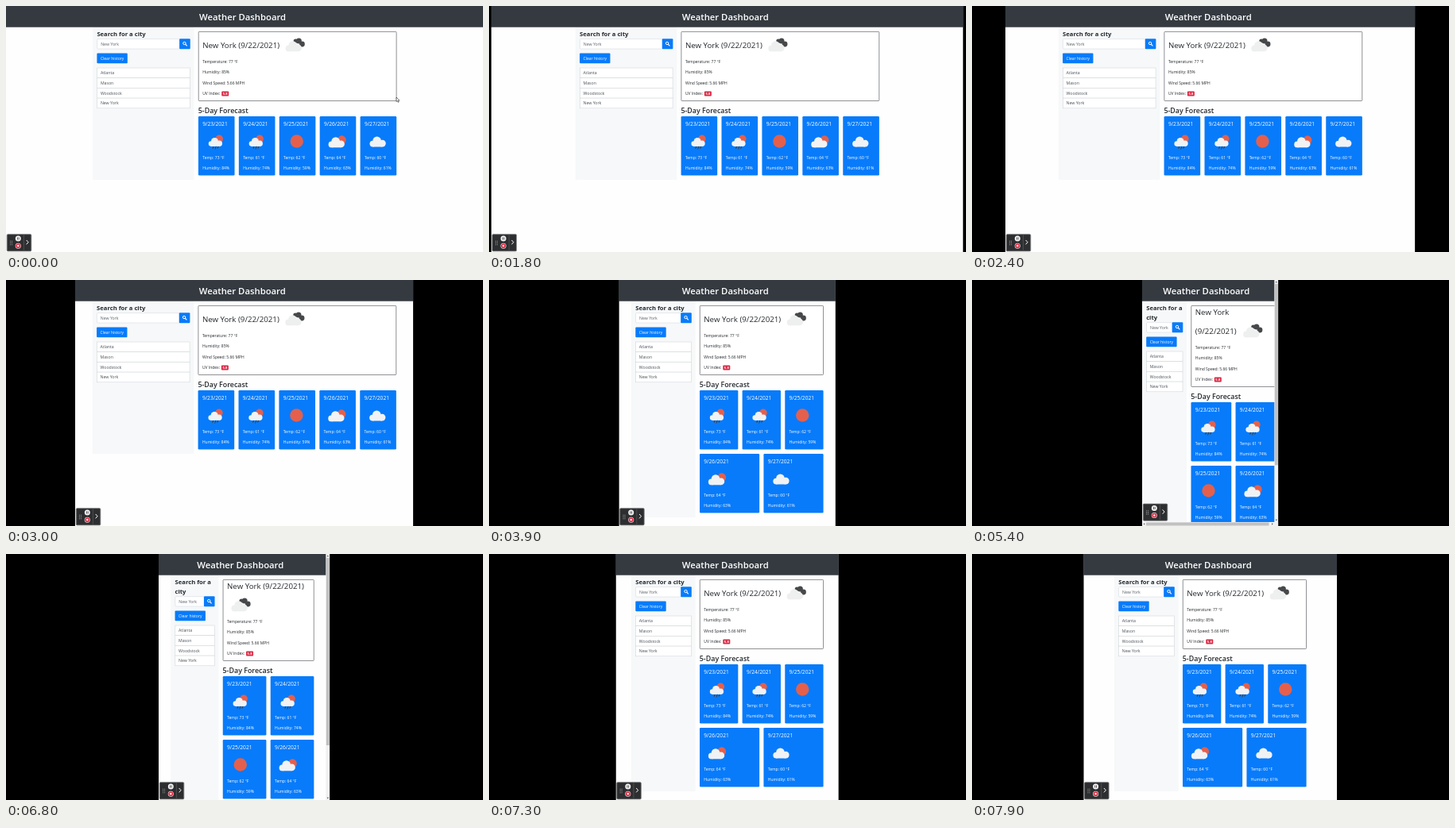
An HTML page for the animation above (8 s loop, 600x310 px).

```html
<!DOCTYPE html>
<html lang="en">
<head>
<meta charset="utf-8">
<title>Weather Dashboard</title>
<style>
html, body { margin: 0; width: 100%; height: 100%; overflow: hidden; background: #000; }
svg { display: block; width: 600px; height: 310px; font-family: "Open Sans", "Noto Sans", sans-serif; }
</style>
</head>
<body>
<svg id="stage" viewBox="0 0 600 310"></svg>
<script>
const LOOP = 8000, STEP = 100, H = 310, BAR = 5;
const BLUE = '#087bfa', INK = '#25292d', SUN = '#e4604d';

// Left edge of the browser window over time
const edge = [[0, 0], [1700, 0], [1800, 2.8], [2600, 55], [3000, 87], [3500, 139], [3900, 163.4],
  [4400, 186], [5300, 210], [5400, 214], [6200, 227], [6300, 228], [6500, 228],
  [6600, 218], [6800, 192], [7400, 153], [7900, 140.3]];
const pointer = [[0, 491, 115], [100, 493, 117], [600, 597, 160], [1000, 597, 160], [1200, 603, 164]];

const days = [
  ['9/23/2021', 'rain', 73, 84], ['9/24/2021', 'rain', 61, 74], ['9/25/2021', 'sun', 62, 59],
  ['9/26/2021', 'partly', 64, 63], ['9/27/2021', 'cloud', 60, 61]
];
const cities = ['Atlanta', 'Mason', 'Woodstock', 'New York'];

function track(keys, t, col = 1) {
  const i = keys.findIndex(k => k[0] > t);
  if (i < 0) return keys[keys.length - 1][col];
  const a = keys[i - 1], b = keys[i];
  return a[col] + (b[col] - a[col]) * (t - a[0]) / (b[0] - a[0]);
}

const rect = (x, y, w, h, fill, extra = '') =>
  `<rect x="${x}" y="${y}" width="${Math.max(0, w)}" height="${h}" fill="${fill}" ${extra}/>`;
const circle = (x, y, r, fill) => `<circle cx="${x}" cy="${y}" r="${r}" fill="${fill}"/>`;
const line = (d, color, w) =>
  `<path d="${d}" fill="none" stroke="${color}" stroke-width="${w}" stroke-linecap="round"/>`;
const text = (x, y, s, size, fill = INK, weight = 400, anchor = 'start') =>
  `<text x="${x}" y="${y}" font-size="${size}" fill="${fill}" font-weight="${weight}" text-anchor="${anchor}">${s}</text>`;
const place = (x, y, body, k = 1) => `<g transform="translate(${x} ${y}) scale(${k})">${body}</g>`;

const cloud = (x, y, k, fill) => place(x, y,
  circle(-6.2, 2.6, 3.9, fill) + circle(-1, -1.2, 5.3, fill) +
  circle(5.8, 2.1, 4.4, fill) + rect(-6.2, 0, 12, 6.5, fill), k);

const icons = {
  rain: circle(4.3, -3.6, 4.8, SUN) + cloud(-.6, .4, .85, '#f1f2f3') +
    line('M-3 6.4l-.8 2.2M.2 6.2l-1 3M3 6.2l-.8 2.2', '#2f3a48', .9),
  sun: circle(0, -.5, 8.2, SUN),
  partly: circle(5.7, -2.3, 5.4, SUN) + cloud(-1, .8, 1, '#f1f2f3'),
  cloud: cloud(0, 0, 1, '#f1f2f3'),
  broken: circle(.5, -5, 2.6, '#46484a') + circle(4.6, -5, 3.5, '#46484a') +
    circle(8.7, -1, 3.4, '#46484a') + cloud(-2, 1.8, 1, '#eeefef')
};

function layout(left) {
  const right = left ? 599.3 - left : 600;
  const width = right - left;
  const tall = width < 261, tiny = width < 196;
  const end = tall ? right - BAR : right;
  const mid = (left + end) / 2;
  const total = tiny ? end - left + 2 : tall ? 180 : width < 337 ? 241.5 : width < 408 ? 322 : 382;
  const x = tiny ? left : mid - total / 2 + .2;
  const mainX = x + total / 3 + 5.4;
  return { left, right, end, mid, tall, tiny, total, x, mainX, mainW: x + total - mainX };
}

function sidebar(p, bottom) {
  const x = p.x + 5.2, w = p.total / 3 - 10, wrap = w < 61;
  let s = rect(p.x, 26.7, p.total / 3, bottom - 26.7, '#f6f8f9');
  const head = !wrap ? ['Search for a city'] : w < 44 ? ['Search', 'for a city'] : ['Search for a', 'city'];
  head.forEach((h, i) => s += text(x, 37.5 + i * 12, h, 7.65, INK, 700));
  let b = rect(x + .3, 41.6, w - 13.5, 12.4, '#fff', 'stroke="#ced4da" stroke-width=".5" rx="1"');
  b += text(x + 4.8, 49.8, 'New York', 5.2, '#5a6168');
  b += rect(x + w - 13.6, 41.3, 13.6, 13, BLUE, 'rx="1"');
  b += place(x + w - 6.8, 47.5, '<circle cx="-.5" cy="-.5" r="1.7" fill="none" stroke="#fff"/>' + line('M.9 .9L2.5 2.5', '#fff', 1.1));
  b += rect(x, 59.5, 38.4, 12.8, BLUE, 'rx="1"') + text(x + 19.2, 67.8, 'Clear history', 5, '#fff', 400, 'middle');
  cities.forEach((c, i) => {
    const y = 78 + i * 12.7;
    b += rect(x + .3, y, w - .6, 12.7, '#fff', 'stroke="#d3d7da" stroke-width=".6"');
    b += text(x + 4.5, y + 8.3, c, 5.2, '#495057');
  });
  return s + place(0, wrap ? 12 : 0, b);
}

// The heading and its icon wrap like inline content
function headingLines(room) {
  const parts = room < 96.5 ? [['New York', 43], ['(9/22/2021)', 53]] : [['New York (9/22/2021)', 97]];
  const last = parts[parts.length - 1];
  const inline = last[1] + 36.5 <= room;
  return { parts, inline, iconX: inline ? last[1] + 19.5 : 17.5, extra: (parts.length - (inline ? 1 : 0)) * 15 };
}

function current(p, head) {
  const x = p.mainX + 5.3, { parts, inline, iconX, extra } = head;
  let s = rect(p.mainX + .3, 32.4, p.mainW - .4, 87.1 + extra, '#fff', 'stroke="#686d72" stroke-width=".75" rx=".8"');
  parts.forEach((part, i) => {
    const besideIcon = inline && i === parts.length - 1;
    s += text(x, besideIcon ? 53.3 + extra : 43.7 + i * 15, part[0], 9.73);
  });
  s += place(x + iconX, 49 + extra, icons.broken);
  let b = '';
  ['Temperature: 77 °F', 'Humidity: 85%', 'Wind Speed: 5.66 MPH', 'UV Index:'].forEach((row, i) =>
    b += text(x, 72 + i * 13.45, row, 5));
  b += rect(x + 24, 107.4, 9, 6, '#dc2743', 'rx="1"') + text(x + 28.5, 112, '5.8', 4.2, '#fff', 700, 'middle');
  return s + place(0, extra, b);
}

function forecast(p, extra) {
  const gap = 5.3, per = Math.max(1, Math.floor(p.total * 2 / 3 / 50 + .001));
  let s = text(p.mainX - .2, 134.8, '5-Day Forecast', 8.9, INK, 600);
  days.forEach(([date, icon, temp, wet], i) => {
    const row = Math.floor(i / per), n = Math.min(per, days.length - row * per);
    const w = (p.mainW - (n - 1) * gap) / n;
    s += place(p.mainX + (i % per) * (w + gap), 139 + row * 80,
      rect(0, 0, w, 74.5, BLUE, 'rx="1.3"') +
      text(5.3, 12.1, date, 6.65, '#fff') + place(22, 32, icons[icon]) +
      text(5.3, 53.8, `Temp: ${temp} °F`, 5, '#fff') +
      text(5.3, 67.3, `Humidity: ${wet}%`, 5, '#fff'));
  });
  const rows = Math.ceil(days.length / per);
  return { svg: place(0, extra, s), bottom: 139 + extra + rows * 80 };
}

function scrollbars(p, pageH) {
  if (!p.tall) return '';
  const viewH = p.tiny ? H - BAR : H, x = p.end;
  let s = rect(x, 0, BAR, H, '#f1f1f1');
  s += rect(x + .5, 5, BAR - 1, (viewH - 10) * Math.min(1, viewH / pageH), '#c1c1c1');
  s += `<path d="M${x + 1.3} 3.2h2.4l-1.2-1.6zM${x + 1.3} ${viewH - 3.2}h2.4l-1.2 1.6z" fill="#555"/>`;
  if (p.tiny) {
    const w = p.end - p.left;
    s += rect(p.left, viewH, w + BAR, BAR, '#f1f1f1');
    s += rect(p.left + 5, viewH + .5, (w - 10) * w / p.total, BAR - 1, '#c1c1c1');
    s += `<path d="M${p.left + 3.2} ${viewH + 1.3}v2.4l-1.6-1.2zM${x - 3.2} ${viewH + 1.3}v2.4l1.6-1.2z" fill="#555"/>`;
  }
  return s;
}

function recorder(x, y) {
  let s = rect(.4, .4, 30.6, 21.2, '#2d2e30', 'stroke="#77797b" stroke-width=".8" rx="1.2"');
  for (let i = 0; i < 6; i++) s += circle(4.8 + (i % 2) * 2, 9 + Math.floor(i / 2) * 2.2, .55, '#b9babb');
  s += circle(14.5, 5.7, 3.5, '#f4f4f4') + line('M13.6 4.5v2.4M15.4 4.5v2.4', '#333', .8);
  s += circle(14.5, 14.9, 3.5, '#f4f4f4') + circle(14.5, 14.9, 3, '#d92c42') + rect(13.4, 13.8, 2.2, 2.2, '#fff');
  s += line('M21.6 1.5V20', '#626466', .6) + line('M25.1 8l2.2 2.4l-2.2 2.4', '#fff', 1);
  return place(x, y, s);
}

function cursor(t) {
  if (t >= 1200) return '';
  return place(track(pointer, t), track(pointer, t, 2),
    '<path d="M0 0V5.6L1.3 4.4L2.3 6.4L3.2 6L2.3 4.1H4Z" fill="#fff" stroke="#222" stroke-width=".6"/>');
}

function draw(t) {
  const p = layout(track(edge, t));
  const head = headingLines(p.mainW - 11);
  const cards = forecast(p, head.extra);
  return rect(p.left, 0, p.right - p.left, H, '#fefefe') +
    sidebar(p, cards.bottom) + current(p, head) + cards.svg +
    rect(p.left, 0, p.right - p.left, 26.7, '#343a40') +
    text(p.mid - 2.4, 18.2, 'Weather Dashboard', 11.3, '#fff', 600, 'middle') +
    scrollbars(p, cards.bottom) +
    recorder(p.left + .8, p.tiny ? 281.7 : 287.3) + cursor(t) +
    rect(0, 0, p.left, H, '#000') + rect(p.right, 0, 600 - p.right, H, '#000');
}

const stage = document.getElementById('stage');
let shown = -1;
function tick() {
  const t = Math.floor(performance.now() % LOOP / STEP) * STEP;
  if (t !== shown) stage.innerHTML = draw(shown = t);
  requestAnimationFrame(tick);
}
tick();
</script>
</body>
</html>
```
